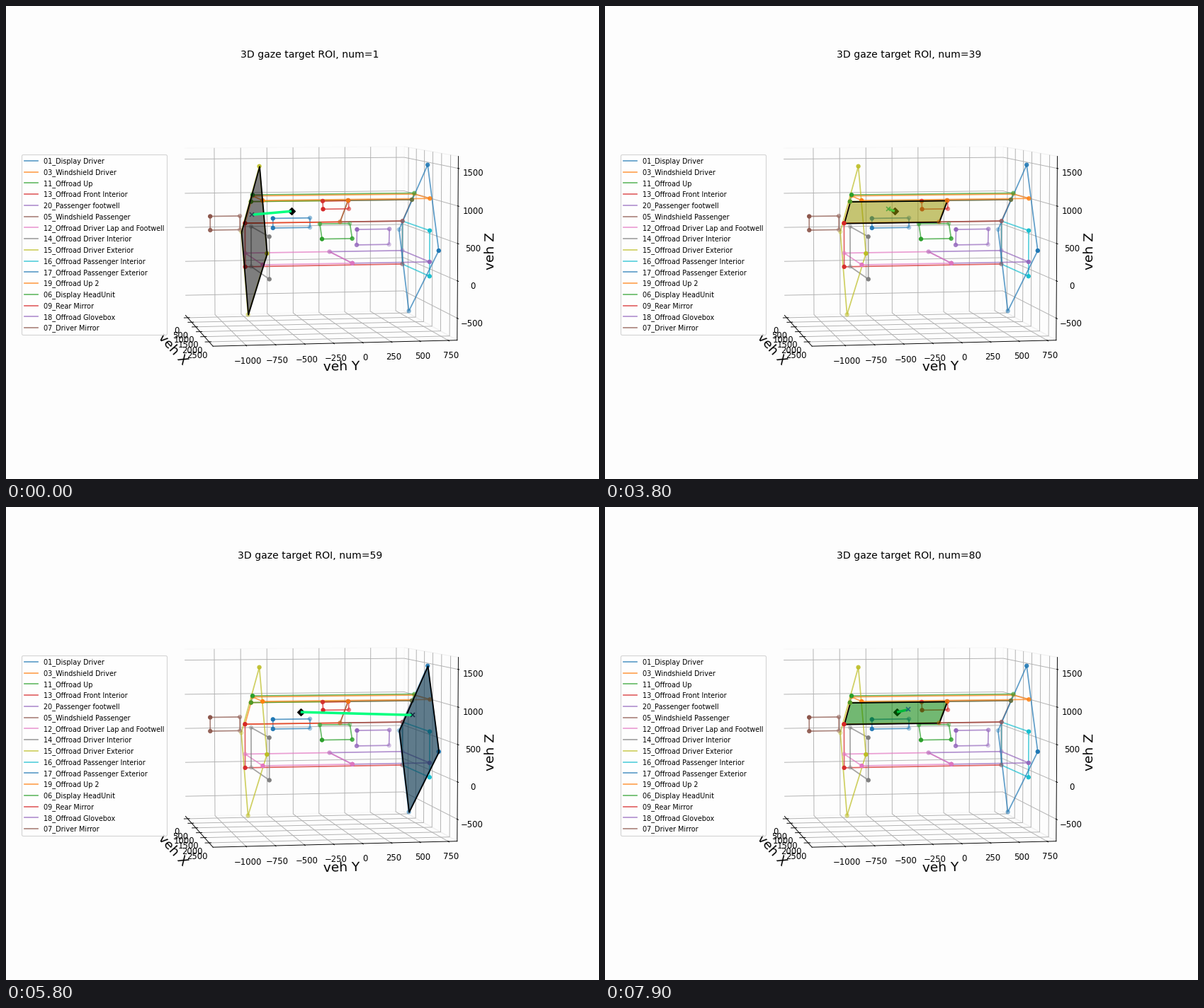
Recreate the animation shown at these times as a matplotlib script. Size 837x669 px, loop 8000 ms.

```python
import numpy as np
import matplotlib.pyplot as plt
from matplotlib.animation import FuncAnimation
from matplotlib.colors import to_rgba
from mpl_toolkits.mplot3d.art3d import Poly3DCollection

FRAMES, STEP = 80, 100
BG = "#fdfdfd"

plt.rcParams["font.family"] = "DejaVu Sans"
fig = plt.figure(figsize=(10, 7.993), dpi=83.7, facecolor=BG)  # 837 x 669
ax = fig.add_subplot(projection="3d", facecolor=BG, computed_zorder=False)

# cabin dimensions in mm
SIDE, FRONT, REAR = 750, 150, 1835
HEADER, ROOF = 750, 900
SILL, FOOT, BELT, TOP = -50, 150, 585, 940


def slab(x0, x1, y0, y1, z0, z1):
    """Rectangle with two edges across the car, possibly leaning."""
    return np.array([(x0, y0, z0), (x0, y1, z0), (x1, y1, z1), (x1, y0, z1)])


def side(x0, x1, y, z0, z1):
    return np.array([(x0, y, z1), (x1, y, z1), (x1, y, z0), (x0, y, z0)])


def diamond(y):
    c, a, b = np.array([(1140, y, 398), (555, 0, 1090), (1215, 0, -43)])
    return np.array([c + a, c + b, c - a, c - b])


ROIS = {
    "01_Display Driver": slab(500, 500, -523, -177, 677, 539),
    "03_Windshield Driver": slab(FRONT, HEADER, -SIDE, 150, BELT, TOP),
    "11_Offroad Up": slab(HEADER, ROOF, -SIDE, SIDE, TOP, 1045),
    "13_Offroad Front Interior": slab(FRONT, FRONT, -SIDE, SIDE, BELT, SILL),
    "20_Passenger footwell": slab(FRONT, REAR, 50, SIDE, FOOT, FOOT),
    "05_Windshield Passenger": slab(FRONT, HEADER, 150, SIDE, BELT, TOP),
    "12_Offroad Driver Lap and Footwell": slab(FRONT, REAR, -SIDE, 50, FOOT, FOOT),
    "14_Offroad Driver Interior": side(HEADER, 2410, -SIDE, 15, BELT),
    "15_Offroad Driver Exterior": diamond(-SIDE - 15),
    "16_Offroad Passenger Interior": side(FRONT, REAR, SIDE, SILL, BELT),
    "17_Offroad Passenger Exterior": diamond(SIDE),
    "19_Offroad Up 2": slab(ROOF, REAR, -SIDE, SIDE, 1030, 1030),
    "06_Display HeadUnit": slab(500, 670, -84, 199, 588, 385),
    "09_Rear Mirror": slab(900, 930, -105, 134, 946, 833),
    "18_Offroad Glovebox": slab(520, 500, 264, 571, 502, 276),
    "07_Driver Mirror": slab(780, 780, -1127, -856, 740, 545),
}
WINDSHIELD = ROIS["03_Windshield Driver"]
DRIVER_OUT = ROIS["15_Offroad Driver Exterior"]
PASSENGER_OUT = ROIS["17_Offroad Passenger Exterior"]

for i, (name, pts) in enumerate(ROIS.items()):
    color = f"C{i % 10}"
    ax.plot(*np.vstack([pts, pts[:1]]).T, color=color, alpha=0.7, label=name, zorder=3)
    ax.scatter(*pts.T, color=color, zorder=6 if i in (1, 2, 3) else 4)

ax.view_init(elev=5, azim=-10)
ax.set(xlim=(-280, 2910), ylim=(-1280, 828), zlim=(-796, 1660),
       xticks=range(0, 2501, 500), yticks=range(-1000, 751, 250), zticks=range(-500, 1501, 500))
for axis, letter in zip((ax.xaxis, ax.yaxis, ax.zaxis), "XYZ"):
    axis.set_label_text(f"veh {letter}", fontsize=16)
    axis.pane.set_fill(False)
ax.legend(loc="center left", bbox_to_anchor=(-0.3, 0.5), fontsize="small")

# first step, region, fill, cross colour, gaze in front, hit point at start and end
PHASES = [
    (0, DRIVER_OUT, ("black", 0.5), "#2f4050", True, (977, -765, 771), (1100, -765, 800)),
    (5, WINDSHIELD, ("#979500", 0.55), "#55a63c", False, (534, -440, 812), (534, -373, 812)),
    (47, PASSENGER_OUT, ("#0a354e", 0.65), "#10283c", True, (500, SIDE, 825), (889, SIDE, 706)),
    (76, WINDSHIELD, ("green", 0.55), "#1f6577", False, (534, -150, 815), (534, -260, 815)),
]
HEAD_STEPS = 0, 14, 38, 50, 68, 79
HEAD_Y = -469, -443, -431, -393, -380, -411

region = Poly3DCollection([WINDSHIELD], linewidths=1.5)
ax.add_collection3d(region)
head, = ax.plot([], [], [], "D", color="black", ms=6.2)
ray, = ax.plot([], [], [], color="#00ff7f", lw=3, solid_capstyle="butt")
cross, = ax.plot([], [], [], "x", ms=6, mew=1.3, zorder=7.2)


def update(n):
    first, pts, fill, ink, front, start, end = [p for p in PHASES if p[0] <= n][-1]
    eye = np.array((1600, np.interp(n, HEAD_STEPS, HEAD_Y), 860))
    hit = end + np.subtract(start, end) * np.exp((first - n) / 8)
    ax.set_title(f"3D gaze target ROI, num={n + 1}")
    region.set_verts([pts])
    region.set_facecolor(to_rgba(*fill))
    region.set_edgecolor("black")
    region.set_zorder(6.5 if front else 5.5)
    head.set_data_3d(*eye[:, None])
    ray.set_data_3d(*np.array([eye, hit]).T)
    cross.set_data_3d(*hit[:, None])
    cross.set_color(ink)
    head.set_zorder(7 if front else 5)
    ray.set_zorder(7.1 if front else 5.1)
    return region, head, ray, cross


anim = FuncAnimation(fig, update, frames=FRAMES, interval=STEP, repeat=True, repeat_delay=0)
plt.show()
```
